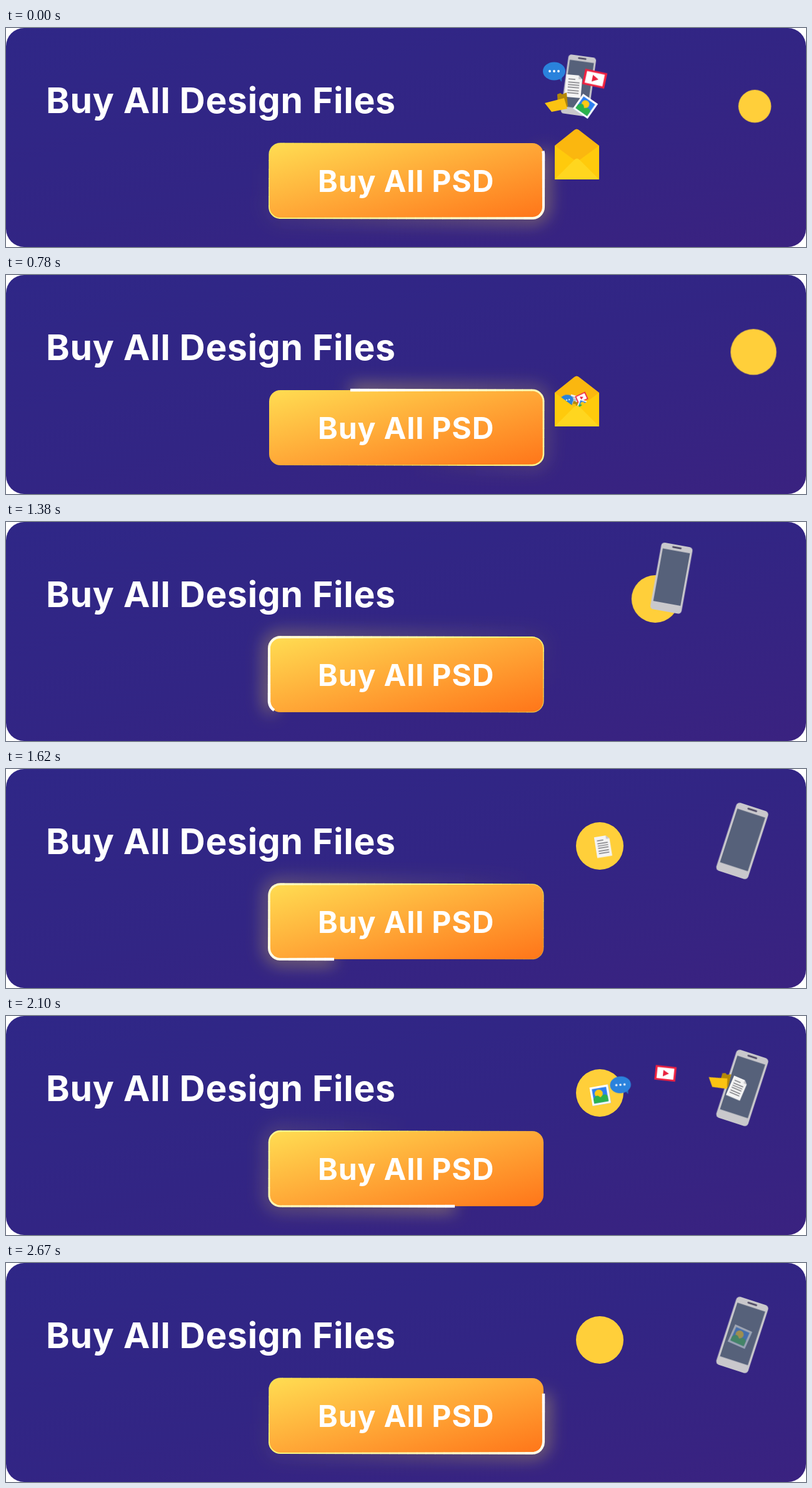
An HTML page that plays this animation: 1280x350 px, repeating every 2.7 s.

```html
<!DOCTYPE html>
<html lang="en">
<head>
<meta charset="utf-8">
<title>Buy All Design Files</title>
<style>
  html, body { margin: 0; width: 100%; height: 100%; overflow: hidden; background: #fff; }
  svg { display: block; width: 100vw; height: 100vh; }
  text { font-family: Inter, "Open Sans", sans-serif; font-weight: 700; font-optical-sizing: none; fill: #fff; }
  .title { font-size: 57px; letter-spacing: .7px; }
  .label { font-size: 48px; letter-spacing: .9px; }

  .seg, .env, .phone, .badge, .fall, .fly { animation: 2700ms linear infinite; }
  .seg { fill: none; animation-name: run; }
  .env { animation-name: close; transform-origin: 913px 202px; }
  .phone { animation-name: phone; }
  .badge { animation-name: badge; }
  .fall { animation-name: fall; }
  .fly {
    animation-name: fly;
    offset-path: path("M950 127Q1062 60 1175 118");
    offset-rotate: 0deg;
  }

  @keyframes run { from { stroke-dashoffset: 0 } to { stroke-dashoffset: -1000 } }

  @keyframes close {
    0%, 35.5% { transform: scale(1) }
    41%, 100% { transform: scale(0) }
  }

  @keyframes phone {
    0% { transform: translate(916px, 92px) rotate(8deg) scale(.95); opacity: 1 }
    11.1% { transform: translate(912px, 76px) rotate(0deg) scale(1) }
    16.7% { transform: translate(912px, 56px) rotate(0deg) scale(1); opacity: 1 }
    20%, 43.3% { transform: translate(914px, 56px) rotate(0deg) scale(1); opacity: 0; animation-timing-function: ease-in-out }
    47% { opacity: 1 }
    57.8%, 100% { transform: translate(1178px, 115px) rotate(18deg) scale(1.14); opacity: 1 }
  }

  @keyframes badge {
    0% { transform: translate(1198px, 125px) scale(.69) }
    11.1% { transform: translate(1197px, 124px) scale(.8) }
    28.9% { transform: translate(1196px, 123px) scale(.965) }
    36%, 43% { transform: translate(1196px, 123px) scale(1); animation-timing-function: ease-in-out }
    57%, 100% { transform: translate(950px, 123px) scale(1) }
  }

  @keyframes fall {
    0% { transform: var(--p0); animation-timing-function: ease-in }
    11.1% { transform: var(--p1) }
    28.9% { transform: var(--p2) }
    35%, 100% { transform: translate(913px, 206px) rotate(0deg) scale(0) }
  }

  @keyframes fly {
    0% { offset-distance: 0%; transform: rotate(-10deg) scale(.93); animation-timing-function: ease-in-out; opacity: 0 }
    .8%, 20.8% { opacity: 1; animation-timing-function: linear }
    23% { offset-distance: 100%; transform: rotate(24deg) scale(.93); opacity: 0 }
    100% { offset-distance: 100%; transform: rotate(24deg) scale(.93); opacity: 0 }
  }
</style>
</head>
<body>
<svg viewBox="0 0 1280 350" preserveAspectRatio="none">
  <defs>
    <linearGradient id="night" x2="1" y2="1">
      <stop stop-color="#2f2787"/><stop offset=".5" stop-color="#322584"/><stop offset="1" stop-color="#3a2280"/>
    </linearGradient>
    <linearGradient id="amber" x2="1" y2="1">
      <stop stop-color="#ffdd52"/><stop offset=".5" stop-color="#ffa837"/><stop offset="1" stop-color="#ff7519"/>
    </linearGradient>
    <filter id="soft" filterUnits="userSpaceOnUse" x="340" y="100" width="600" height="250">
      <feGaussianBlur stdDeviation="13"/>
    </filter>

    <g id="bubble">
      <path d="M6 10L12 17L13 6Z" fill="#1f70c4"/>
      <ellipse rx="18" ry="14.5" fill="#2a82dc"/>
      <g fill="#fff"><circle cx="-7" r="1.9"/><circle r="1.9"/><circle cx="7" r="1.9"/></g>
    </g>
    <g id="doc">
      <path d="M-13-18H7L13-12V18H-13Z" fill="#f4f4f4"/>
      <path d="M7-18V-12H13Z" fill="#c8c8cc"/>
      <path d="M-9-11H2M-9-6H9M-9-2H9M-9 2H9M-9 7H9M-9 11H9" stroke="#77777c" stroke-width="1.6"/>
    </g>
    <g id="folder">
      <path d="M1-14L6-16L9-14L16-17L18 6L2 4Z" fill="#b48708"/>
      <path d="M-19 0L12-8L17 9L-8 14Z" fill="#fcc312"/>
    </g>
    <g id="video">
      <rect x="-18" y="-12.5" width="36" height="25" fill="#f0203f"/>
      <rect x="-14.5" y="-9.5" width="29" height="19" fill="#fff"/>
      <path d="M-4-5.5L6 0L-4 5.5Z" fill="#e8213d"/>
    </g>
    <g id="picture">
      <rect x="-16" y="-16" width="32" height="32" fill="#fff"/>
      <rect x="-12.5" y="-12.5" width="25" height="25" fill="#2d7ff0"/>
      <circle cx="-2" cy="-3" r="7" fill="#ffc914"/>
      <path d="M-12.500 5Q-6-5 0 4Q7-4 12.500 3V12.500H-12.500Z" fill="#2bb24c"/>
    </g>
  </defs>

  <rect width="1280" height="350" rx="29" fill="url(#night)"/>
  <text class="title" x="64" y="136">Buy All Design Files</text>

  <g id="glow" filter="url(#soft)"></g>
  <rect x="421" y="184" width="439" height="120" rx="18" fill="url(#amber)"/>
  <g id="trail"></g>
  <text class="label" x="499" y="262">Buy All PSD</text>

  <circle class="badge" r="38" fill="#ffcf3a"/>
  <path class="env" d="M878 188L908 164Q913 159 918 164L949 188V242H878Z" fill="#fbb70f"/>
  <g class="phone">
    <rect x="-23.500" y="-50" width="47" height="100" rx="5" fill="#c9c8cc"/>
    <rect x="-20.500" y="-41" width="41" height="79" fill="#56617a"/>
    <rect x="-7" y="-47" width="14" height="2.500" rx="1" fill="#4a4560"/>
  </g>
  <g id="falling"></g>
  <g class="env">
    <path d="M878 188L913.500 214L949 188V242H878Z" fill="#ffca0c"/>
    <path d="M878 242L909 211Q913.500 206 918 211L949 242Z" fill="#ffd61f"/>
  </g>
  <g id="flying"></g>
</svg>
<script>
  const LOOP = 2700;
  const OUTLINE = "M860 202A18 18 0 0 0 842 184H439A18 18 0 0 0 421 202V286A18 18 0 0 0 439 304H842A18 18 0 0 0 860 286Z";
  const byId = id => document.getElementById(id);

  function add(parent, tag, attrs) {
    const el = document.createElementNS("http://www.w3.org/2000/svg", tag);
    for (const key in attrs) el.setAttribute(key, attrs[key]);
    return byId(parent).appendChild(el);
  }

  // A tapering streak built from short dashes; u runs from head (0) to tail (1).
  function streak(parent, count, length, look) {
    const step = length / count;
    for (let k = count - 1; k >= 0; k--) {
      const start = (1004 - (k + 1) * step) % 1000;
      const dash = step + .6;
      add(parent, "path", {
        class: "seg", d: OUTLINE, pathLength: 1000,
        "stroke-dasharray": `${dash} ${1000 - dash}`,
        style: `animation-delay:${-start / 1000 * LOOP}ms`,
        ...look(k / count)
      });
    }
  }

  streak("trail", 60, 800, u => ({
    stroke: `hsl(56 100% ${100 - 38 * Math.min(1, u * 1.2)}%)`,
    "stroke-width": .8 + 3.7 * (1 - u) ** 1.3,
    "stroke-opacity": Math.min(1, (1 - u) * 2.5)
  }));
  streak("glow", 14, 560, u => ({
    stroke: "#ffe04d", "stroke-width": 18, "stroke-opacity": .42 * (1 - u)
  }));

  // Poses are [x, y, angle, scale]: scattered, dropping, inside the envelope.
  const items = [
    ["doc", 1550, [908, 93, 5, 1], [908, 178, -10, .85], [908, 201, 15, .5]],
    ["folder", 1650, [881, 120, 0, 1], [890, 162, 8, .7], [905, 208, 20, .5]],
    ["video", 1800, [942, 81, 12, 1], [930, 141, -5, .76], [921, 196, -25, .5]],
    ["bubble", 1930, [877, 69, 0, 1], [885, 123, 0, .78], [897, 200, -10, .6]],
    ["picture", 2075, [927, 125, 35, .9], [925, 178, 20, .75], [923, 208, 20, .5]]
  ];
  const pose = ([x, y, a, s]) => `translate(${x}px,${y}px) rotate(${a}deg) scale(${s})`;

  for (const [name, start, ...poses] of items) {
    const vars = poses.map((p, i) => `--p${i}:${pose(p)}`).join(";");
    add("falling", "use", { href: "#" + name, class: "fall", style: vars });
    add("flying", "use", { href: "#" + name, class: "fly", style: `animation-delay:${start - LOOP}ms` });
  }
</script>
</body>
</html>
```
